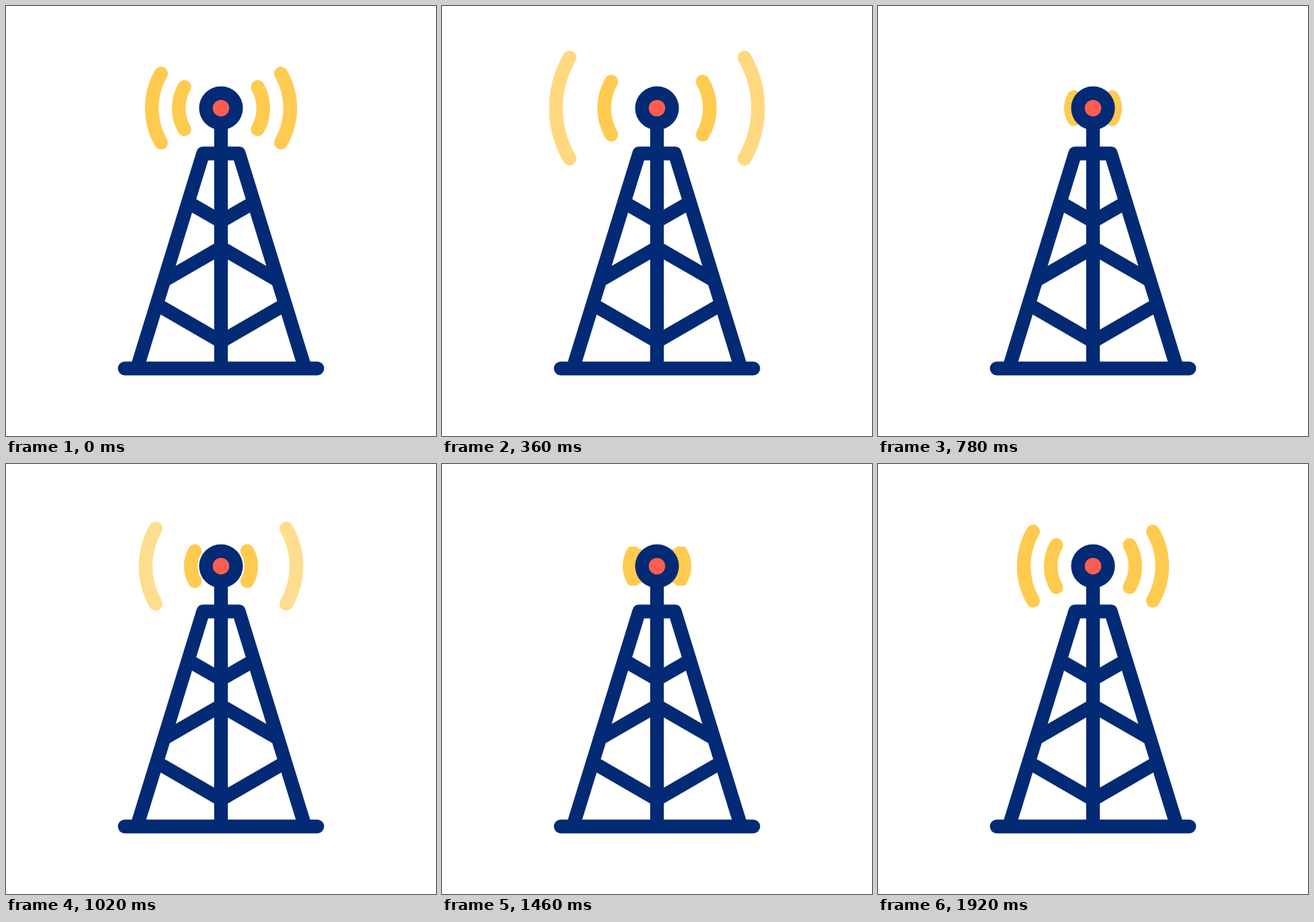
An HTML page with a canvas that plays this animation: 640x640 px, repeating every 2.4 s.

```html
<!DOCTYPE html>
<html lang="en">
<head>
<meta charset="utf-8">
<title>Radio tower</title>
<style>
  html, body { margin: 0; height: 100%; overflow: hidden; background: #fff; }
  canvas { display: block; width: 100vw; height: 100vh; }
</style>
</head>
<body>
<canvas id="stage" width="640" height="640"></canvas>
<script>
const ctx = document.getElementById('stage').getContext('2d');
const NAVY = '#022a75', YELLOW = '#ffca50', RED = '#ff5d50';
const CX = 320, CY = 152, STROKE = 20.4, LOOP = 2400, STEP = 20;

const frame = new Path2D(
  'M195.6 537L293.4 219.5H346.6L444.4 537' +
  'M320 180V535' +
  'M272 292.8L320 320.5L368 292.8' +
  'M238 407L320 359.7L402 407' +
  'M226 445L320 499.3L414 445');
const base = new Path2D('M176.7 539.5H463.3');

// Each wave grows from one radius to another; fade is the start of its fade-out.
const waves = [
  { start: 0, move: 20, span: 600, from: 103, to: 182, fade: 295 },
  { start: 0, move: 20, span: 600, from: 63, to: 89, fade: 427 },
  { start: 650, move: 650, span: 650, from: 16.3, to: 175.3, fade: 932 },
  { start: 760, move: 760, span: 590, from: 19.7, to: 81.1, fade: 1065 },
  { start: 1250, move: 1250, span: 670, from: 22, to: 103, clipped: true },
  { start: 1250, move: 1250, span: 670, from: 22, to: 63 }
];
const FADE_TIME = 240;

const clamp = x => Math.max(0, Math.min(1, x));
const ease = x => x * x * (3 - 2 * x);
const radius = (w, t) => w.from + (w.to - w.from) * ease(clamp((t - w.move) / w.span));

function drawWave(w, t) {
  const alpha = w.fade ? 1 - clamp((t - w.fade) / FADE_TIME) : 1;
  if (t < w.start || alpha === 0) return;
  const r = radius(w, t);
  ctx.save();
  if (w.clipped) {
    // The visible band opens one step behind the wave.
    const half = radius(w, t - STEP) / 2 + STROKE / 2;
    ctx.beginPath();
    ctx.rect(0, CY - half, 640, half * 2);
    if (t < w.move + w.span) ctx.clip();
  }
  ctx.globalAlpha = alpha;
  ctx.strokeStyle = YELLOW;
  ctx.lineCap = 'round';
  for (const mid of [0, Math.PI]) {
    ctx.beginPath();
    ctx.arc(CX, CY, r, mid - Math.PI / 6, mid + Math.PI / 6);
    ctx.stroke();
  }
  ctx.restore();
}

function disc(r, color) {
  ctx.fillStyle = color;
  ctx.beginPath();
  ctx.arc(CX, CY, r, 0, Math.PI * 2);
  ctx.fill();
}

function drawTower() {
  ctx.strokeStyle = NAVY;
  ctx.lineJoin = 'round';
  ctx.lineCap = 'butt';
  ctx.stroke(frame);
  ctx.lineCap = 'round';
  ctx.stroke(base);
  disc(32.6, NAVY);
  disc(12.3, RED);
}

const begin = performance.now();
function render() {
  const elapsed = (performance.now() - begin) % LOOP;
  const t = Math.floor(elapsed / STEP) * STEP;
  ctx.fillStyle = '#fff';
  ctx.fillRect(0, 0, 640, 640);
  ctx.lineWidth = STROKE;
  waves.forEach(w => drawWave(w, t));
  drawTower();
  requestAnimationFrame(render);
}
render();
</script>
</body>
</html>
```
